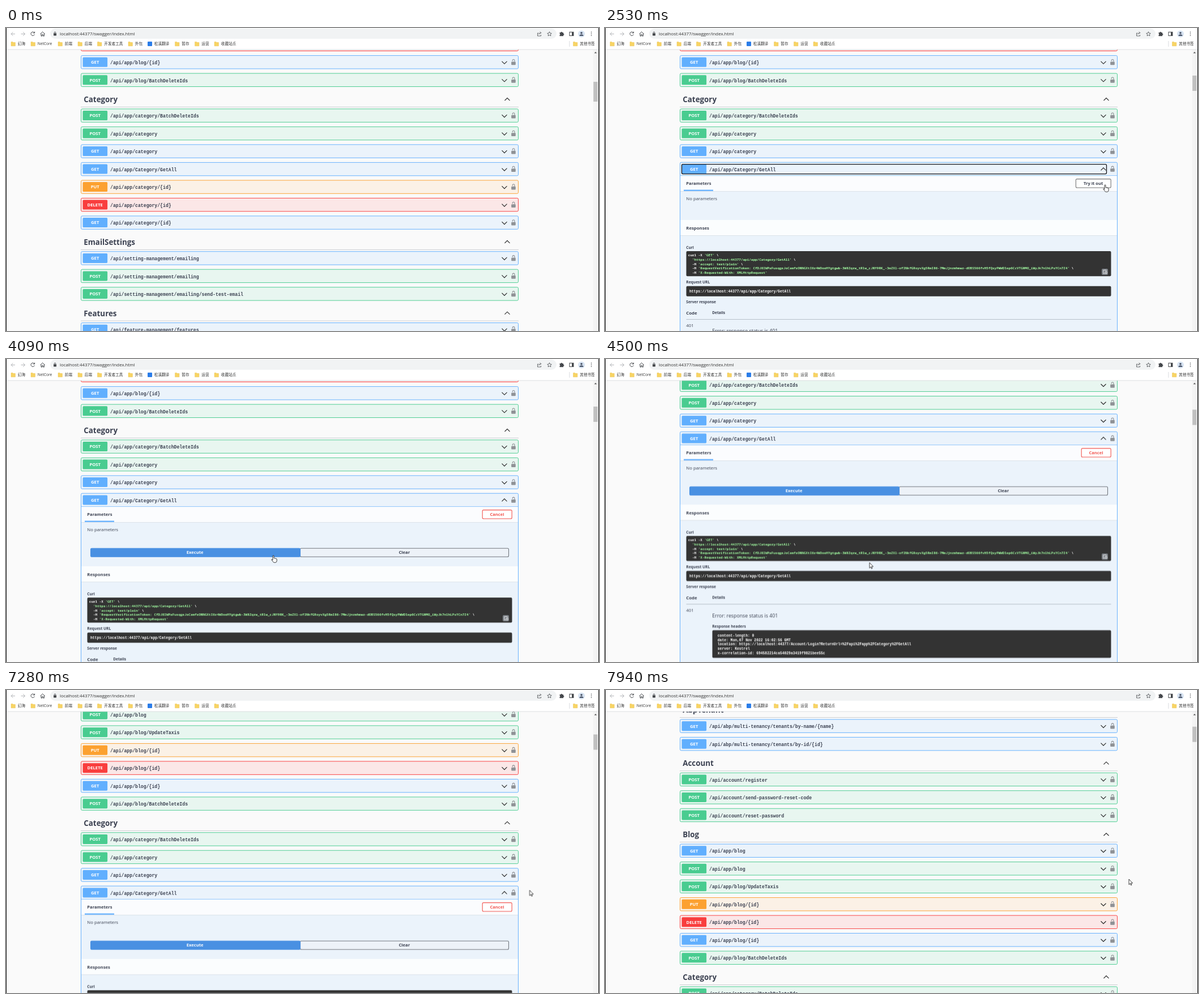
Write an HTML page that moves like this. It is 1047 by 535 pixels and loops after 8000 ms.

```html
<!DOCTYPE html>
<html lang="zh">
<head>
<meta charset="utf-8">
<title>API explorer</title>
<style>
@property --unit { syntax: '<number>'; inherits: true; initial-value: 0; }
html, body { margin: 0; width: 100%; height: 100%; overflow: hidden; background: #fafafa; }
svg { display: block; width: 1047px; height: 535px; animation: wheel 8s step-end infinite; }
text { font-family: "Open Sans", "Noto Sans", "Noto Sans CJK SC", sans-serif; fill: #3b4151; white-space: pre; }
.b { font-weight: 700; }
.i { font-style: italic; }
.mid { text-anchor: middle; }
.path, .log { font-family: "Liberation Mono", monospace; font-weight: 700; }
.code { font-family: "Noto Sans Mono", monospace; font-weight: 700; fill: #fff; }
.code tspan { fill: #a2fca2; }
.white, .log { fill: #fff; }
.red { fill: #f2554f; }
.chrome { fill: #333; }
.line { fill: none; stroke: #222; stroke-width: 1.1; }
.icon { fill: none; stroke: #45484c; stroke-width: 1; }

#page { transform: translateY(calc(var(--unit) * -54.42px)); }
#thumb { transform: translateY(calc(var(--unit) * 2.75px)); }
#pointer { animation: pointer 8s linear infinite; }
.step { animation: 8s step-end infinite; }
#thumb rect { animation-name: thumb; }
#panel { animation-name: panel; }
#idle { animation-name: idle; }
#ready { animation-name: ready; }
#low { animation-name: low; }
#hand { animation-name: hand; }
#arrow { animation-name: arrow; }
#glow { animation-name: glow; }
#picked { transform-origin: 193.5px 0; animation: pick 8s linear infinite; }

@keyframes wheel {
  0% { --unit: 0 } 55.25% { --unit: 1 } 56.25% { --unit: 2 } 58.25% { --unit: 2.6 } 60.25% { --unit: 3 }
  86.5% { --unit: 2 } 87.75% { --unit: 0 } 91% { --unit: -2 } 92% { --unit: -3 }
  94% { --unit: -4 } 98.12% { --unit: -6 } 99.25%, 100% { --unit: -7 }
}
@keyframes pointer {
  0%, .87% { transform: translate(960px, 490px) }
  5%, 8% { transform: translate(496px, 289px) }
  9.5% { transform: translate(479px, 268px) }
  11.25%, 14.37% { transform: translate(502px, 259px) }
  15.37%, 23.62% { transform: translate(503px, 257px) }
  28% { transform: translate(905px, 272px) }
  31.6%, 33.62% { transform: translate(883px, 277px) }
  41.6%, 44.6% { transform: translate(470px, 338px) }
  44.62%, 46.75% { transform: translate(470px, 344px) }
  51.1%, 55.24% { transform: translate(472px, 347px) }
  56.25%, 62.5% { transform: translate(467px, 359.5px) }
  71.25%, 73.37% { transform: translate(193px, 399px) }
  78.37%, 81.5% { transform: translate(320px, 394px) }
  84.5%, 98.11% { transform: translate(924.5px, 353.5px) }
  98.12%, 100% { transform: translate(925px, 334px) }
}
@keyframes thumb { 0% { y: 95px; height: 35px } 19.5%, 100% { y: 84px; height: 27px } }
@keyframes panel { 0% { opacity: 0 } 19.5%, 100% { opacity: 1 } }
@keyframes idle { 0% { opacity: 1 } 34.6%, 100% { opacity: 0 } }
@keyframes ready { 0% { opacity: 0 } 34.6%, 100% { opacity: 1 } }
@keyframes low {
  0% { transform: none } 34.6% { transform: translateY(27.2px) }
  47.87% { transform: translateY(87px) } 49.87%, 100% { transform: translateY(27.2px) }
}
@keyframes hand { 0% { opacity: 0 } 2% { opacity: 1 } 26% { opacity: 0 } 31% { opacity: 1 } 35.5% { opacity: 0 } 41% { opacity: 1 } 55.25%, 100% { opacity: 0 } }
@keyframes arrow { 0% { opacity: 0 } .87% { opacity: 1 } 2% { opacity: 0 } 26% { opacity: 1 } 31% { opacity: 0 } 35.5% { opacity: 1 } 41% { opacity: 0 } 55.25%, 100% { opacity: 1 } }
@keyframes glow { 0% { opacity: 0 } 18.5% { opacity: 1 } 20.6% { opacity: 0 } 33.62% { opacity: 1 } 35.5% { opacity: 0 } 46.75% { opacity: 1 } 48.9% { opacity: 0 } 73.37% { opacity: 1 } 81.5%, 100% { opacity: 0 } }
@keyframes pick { 0%, 73.4% { transform: scaleX(0) } 77.8%, 100% { transform: scaleX(1) } }
</style>
</head>
<body>
<svg id="stage" viewBox="0 0 1047 535"></svg>
<script>
const colors = { GET: '#61affe', POST: '#49cc90', PUT: '#fca130', DELETE: '#f93e3e' };
const sections = {
  AbpTenant: ['GET /api/abp/multi-tenancy/tenants/by-name/{name}', 'GET /api/abp/multi-tenancy/tenants/by-id/{id}'],
  Account: ['POST /api/account/register', 'POST /api/account/send-password-reset-code', 'POST /api/account/reset-password'],
  Blog: ['GET /api/app/blog', 'POST /api/app/blog', 'POST /api/app/blog/UpdateTaxis', 'PUT /api/app/blog/{id}',
    'DELETE /api/app/blog/{id}', 'GET /api/app/blog/{id}', 'POST /api/app/blog/BatchDeleteIds'],
  Category: ['POST /api/app/category/BatchDeleteIds', 'POST /api/app/category', 'GET /api/app/category',
    'GET /api/app/Category/GetAll', 'PUT /api/app/category/{id}', 'DELETE /api/app/category/{id}', 'GET /api/app/category/{id}'],
  EmailSettings: ['GET /api/setting-management/emailing', 'POST /api/setting-management/emailing',
    'POST /api/setting-management/emailing/send-test-email'],
  Features: ['GET /api/feature-management/features']
};

// Text is placed by the middle of its letters.
const text = (x, y, size, str, cls = '') =>
  `<text x="${x}" y="${(y + size * .36).toFixed(2)}" font-size="${size}" class="${cls}">${str}</text>`;
const rect = (x, y, w, h, fill, more = '') =>
  `<rect x="${x}" y="${y}" width="${w}" height="${h}" fill="${fill}" ${more}/>`;
const path = (d, cls = 'line', more = '') => `<path d="${d}" class="${cls}" ${more}/>`;
const chevron = (x, y, up) => path(`M${x - 4.5} ${y + 2 * up}l4.5 ${-4.5 * up} 4.5 ${4.5 * up}`);

const lock = y => rect(892.2, y - 1, 7.6, 5.8, '#8f9296', 'rx="1"') +
  path(`M894.2 ${y - 2}v-.8a1.9 2.1 0 0 1 3.8 0v2`, 'line', 'style="stroke:#8f9296"');

function box(y, height, color) {
  const shape = `rx="2" stroke="${color}" stroke-width=".95"`;
  return rect(132.5, y - 11.8, 772, height, color, `fill-opacity=".1" ${shape}`);
}

function summary(y, operation, up = -1) {
  const [method, route] = operation.split(' ');
  return rect(135.5, y - 8.6, 43.6, 17, colors[method], 'rx="1.6"') +
    text(157.2, y, 7.7, method, 'b white mid') +
    text(184, y + .7, 8.17, route, 'path') + chevron(880, y + .4, up) + lock(y);
}

function listing() {
  let y = -345.8, out = '';
  for (const [name, operations] of Object.entries(sections)) {
    out += text(137.3, y, 13.35, name, 'b') + chevron(885, y, 1) + rect(132, y + 13, 773, .8, '#c1c4c9');
    y += 28.6;
    for (const operation of operations) {
      out += box(y, 23.4, colors[operation.split(' ')[0]]) + summary(y, operation);
      y += 31.5;
    }
    y += 2.7;
  }
  return out;
}

const strip = y => rect(133, y + 27, 771, 1, '#dce3ea') + rect(133, y, 771, 27, '#fff', 'fill-opacity=".8"');
const dark = (x, y, h) => rect(x, y, 893.5 - x, h, '#333', 'rx="2"');
const rule = y => rect(143.5, y, 750, .8, '#a9b3c0');
const button = (x, y, w, h, fill, stroke) => rect(x, y, w, h, fill, `rx="2" stroke="${stroke}" stroke-width="1.1"`);

const api = 'https://localhost:44377/api/app/Category/GetAll';
const token = 'CfDJ8IWPaFusqgxJoCamfxONNGXtI6r4WOooHYgtgwb-3W8Zqrw_tR1w_cJNY9RK_-3mZXl-ofINkfGRoyvXg5RmI86-7MmJjnrmhmwz-dOBS566fvH5fQsyPWWD1ep6CcVTG0MO_iWyJk7n1hLPsYCn7Z4';
const curl = [
  "curl -X 'GET' \\", `  '${api}' \\`, "  -H 'accept: text/plain' \\",
  `  -H 'RequestVerificationToken: ${token}' \\`, "  -H 'X-Requested-With: XMLHttpRequest'"
];
const headers = [
  'content-length: 0', 'date: Mon,07 Nov 2022 16:02:56 GMT',
  'location: https://localhost:44377/Account/Login?ReturnUrl=%2Fapi%2Fapp%2FCategory%2FGetAll',
  'server: Kestrel', 'x-correlation-id: 694582214ca54029a3419f9821bee55c'
];
const error = cls => text(189.2, 535, 8.78, 'Error: response status is 401', cls);
const quoted = line => line.replace(/'.*'/, '<tspan>$&</tspan>');

const responses = () => strip(339) + text(143.3, 353, 7.75, 'Responses', 'b') +
  text(143.3, 387.2, 6.6, 'Curl', 'b') + dark(143.5, 394, 44.3) +
  curl.map((line, i) => text(146.8, 401.2 + i * 7.63, 5.98, quoted(line), 'code')).join('') +
  rect(877, 425, 11, 11, '#7d8288', 'rx="2"') +
  path('M880 427.5h5v2m-5-2v6h2m1-3h3v3h-3z', 'line', 'style="stroke:#fff;stroke-width:.8"') +
  text(143.3, 448.8, 6.65, 'Request URL', 'b') + dark(143.5, 455.8, 18) + text(149, 464.7, 6.35, api, 'log') +
  text(143.3, 484, 6.6, 'Server response', 'b') +
  text(143.3, 502.8, 7.8, 'Code', 'b') + text(189.2, 503, 6.6, 'Details', 'b') + rule(514.2) +
  text(143.3, 525.2, 7.8, '401') + error() +
  `<g clip-path="url(#selection)">${rect(193, 529, 114, 12, '#3390ff')}${error('white')}</g>` +
  text(189.2, 553.6, 6.6, 'Response headers', 'b') + dark(189.5, 560.6, 48.6) +
  headers.map((line, i) => text(198.8, 569.8 + i * 7.63, 6.33, line, 'log')).join('') +
  text(143.3, 619.5, 6.6, 'Responses', 'b') +
  text(143.3, 638.6, 7.8, 'Code', 'b') + text(189.2, 638.8, 6.6, 'Description', 'b') +
  text(863, 638.6, 7.6, 'Links', 'b') + rule(650) +
  text(143.3, 661, 7.8, '200') + text(863, 661, 7.9, 'No links', 'i') + text(189.2, 670.5, 8.78, 'Success');

const panel = () => rect(131, 236, 776, 900, '#fafafa') + box(249, 900, colors.GET) +
  summary(249, 'GET /api/app/Category/GetAll', 1) +
  rect(133, 260.4, 771, .8, colors.GET) + strip(261) +
  text(143.3, 274.6, 7.6, 'Parameters', 'b') + rect(139, 285.6, 52, 2.2, colors.GET) +
  text(143.3, 301.2, 7.8, 'No parameters') +
  `<g id="idle" class="step">
    ${rect(135.5, 240.6, 750, 17, 'none', 'rx="2" stroke="#15171c" stroke-width="1.3"')}
    ${button(831.4, 266.6, 61.8, 15.4, '#fff', '#777')}${text(862.2, 274.2, 7.6, 'Try it out', 'b mid')}
  </g>
  <g id="ready" class="step">
    ${button(841.2, 266.6, 52, 15.4, '#fff', '#f2554f')}${text(867, 274.2, 7.6, 'Cancel', 'b red mid')}
    ${button(519.5, 334.2, 368, 15, '#edf2f8', '#73777f')}${text(703.3, 341.7, 7.6, 'Clear', 'b mid')}
    ${button(149.5, 334.2, 370, 15, '#4990e2', '#4990e2')}${text(333.7, 341.7, 7.6, 'Execute', 'b white mid')}
  </g>
  <g id="low" class="step">${responses()}</g>`;

const bookmarks = [[9, '幻海'], [44, 'NetCore'], [92, '前端'], [127, '后端'], [161.5, '开发者工具'], [216, '外包'],
  [250, '松溪翻译'], [298.5, '暂存'], [333.5, '运营'], [368, '收藏站点'], [1001.5, '其他书签']];

function bookmark([x, label]) {
  const icon = label.endsWith('翻译')
    ? rect(x, 24, 8, 8, '#2b7de9', 'rx="1"')
    : path(`M${x} 24.5h3l1 1h3.4v6.3h-7.4z`, '', 'fill="#f8d464" stroke="#e5b93c" stroke-width=".4"');
  return icon + text(x + 11.8, 28, 6.6, label, 'chrome');
}

const toolbar = () => rect(0, 0, 1047, 38, '#fff') + rect(0, 37.6, 1047, .8, '#d5d7da') +
  rect(78, 1, 894, 18, '#f1f3f4', 'rx="9"') +
  path('M16 10.5h-7m3.4-3.4l-3.4 3.4 3.4 3.4M26.5 10.5h7m-3.4-3.4l3.4 3.4-3.4 3.4', 'icon', 'style="stroke:#b4b6b9"') +
  path('M50 8.3a3.3 3.3 0 1 0 .4 3M50.6 6.5v2.4h-2.6M60.6 10.5l4-3.8 4 3.8M62 10v4.2h1.8v-2.4h1.8v2.4h1.8v-4.2', 'icon') +
  rect(84, 9.2, 5, 4.2, '#45484c', 'rx=".6"') + path('M85.2 9.4v-1a1.3 1.5 0 0 1 2.6 0v1', 'icon', 'stroke-width=".8"') +
  text(95, 10.3, 7.85, 'localhost:44377/swagger/index.html', 'chrome') +
  path('M940.5 9h-2v5h6v-2M940.5 11.5q.4-3 4-3m-1.7-2l2 2-2 2', 'icon', 'style="stroke-width:.8"') +
  path('M959.5 6.6l1.1 2.5 2.7.3-2 1.8.6 2.7-2.4-1.4-2.4 1.4.6-2.7-2-1.8 2.7-.3z', 'icon', 'style="stroke-width:.8"') +
  path('M977.5 8h2a1.3 1.3 0 0 1 2.6 0h2v2a1.3 1.3 0 0 1 0 2.6v1.6h-6.6v-2a1.3 1.3 0 0 0 0-2.4z', '', 'fill="#45484c"') +
  rect(995, 7.2, 7, 6.4, 'none', 'stroke="#45484c"') + rect(999, 7, 3, 6.8, '#45484c') +
  '<circle cx="1016" cy="10.5" r="6" fill="#d7e3f2"/><circle cx="1016" cy="8.8" r="1.8" fill="#4a5568"/>' +
  path('M1012.5 14q0-2.8 3.5-2.8t3.5 2.8z', '', 'fill="#4a5568"') +
  [7.3, 10.3, 13.3].map(y => `<circle cx="1033.5" cy="${y}" r=".8" fill="#45484c"/>`).join('') +
  bookmarks.map(bookmark).join('') + rect(994.5, 23, .8, 10, '#cfd2d6');

const scrollbar = () => rect(1036.5, 38.4, 9.5, 497, '#f4f4f4') +
  path('M1038.7 44.6l2.2-2.6 2.2 2.6z', '', 'fill="#505050"') +
  `<g id="thumb">${rect(1037.2, 84, 7.4, 27, '#c1c1c1', 'class="step"')}</g>`;

const outline = 'fill="#fff" stroke="#111" stroke-width=".8" stroke-linejoin="round"';
const pointer = () => `<g id="pointer">
  <circle id="glow" class="step" r="6.3" fill="#f3e738" fill-opacity=".8"/>
  <g id="arrow" class="step">${path('M0 0V9.6L2.2 7.6 3.6 10.7 5 10.1 3.6 7H6.6Z', '', outline)}</g>
  <g id="hand" class="step">${path('M-1 8V.9a1 1 0 0 1 2 0V4.6l4 .8q1.2.4 1.2 1.6V9q0 3-2.2 3.3H1.2q-1 0-2-1.8L-3.3 7.2q.6-1.2 2.3.8z', '', outline)}</g>
</g>`;

document.getElementById('stage').innerHTML = `
  <defs><clipPath id="selection"><rect id="picked" x="193.5" y="529" width="112.5" height="12"/></clipPath></defs>
  ${rect(0, 0, 1047, 535, '#fafafa')}
  <g id="page">${listing()}<g id="panel" class="step">${panel()}</g></g>
  ${scrollbar()}${toolbar()}
  ${rect(0, 0, 1, 535, '#111')}${rect(1046, 0, 1, 535, '#111')}
  ${pointer()}`;
</script>
</body>
</html>
```
